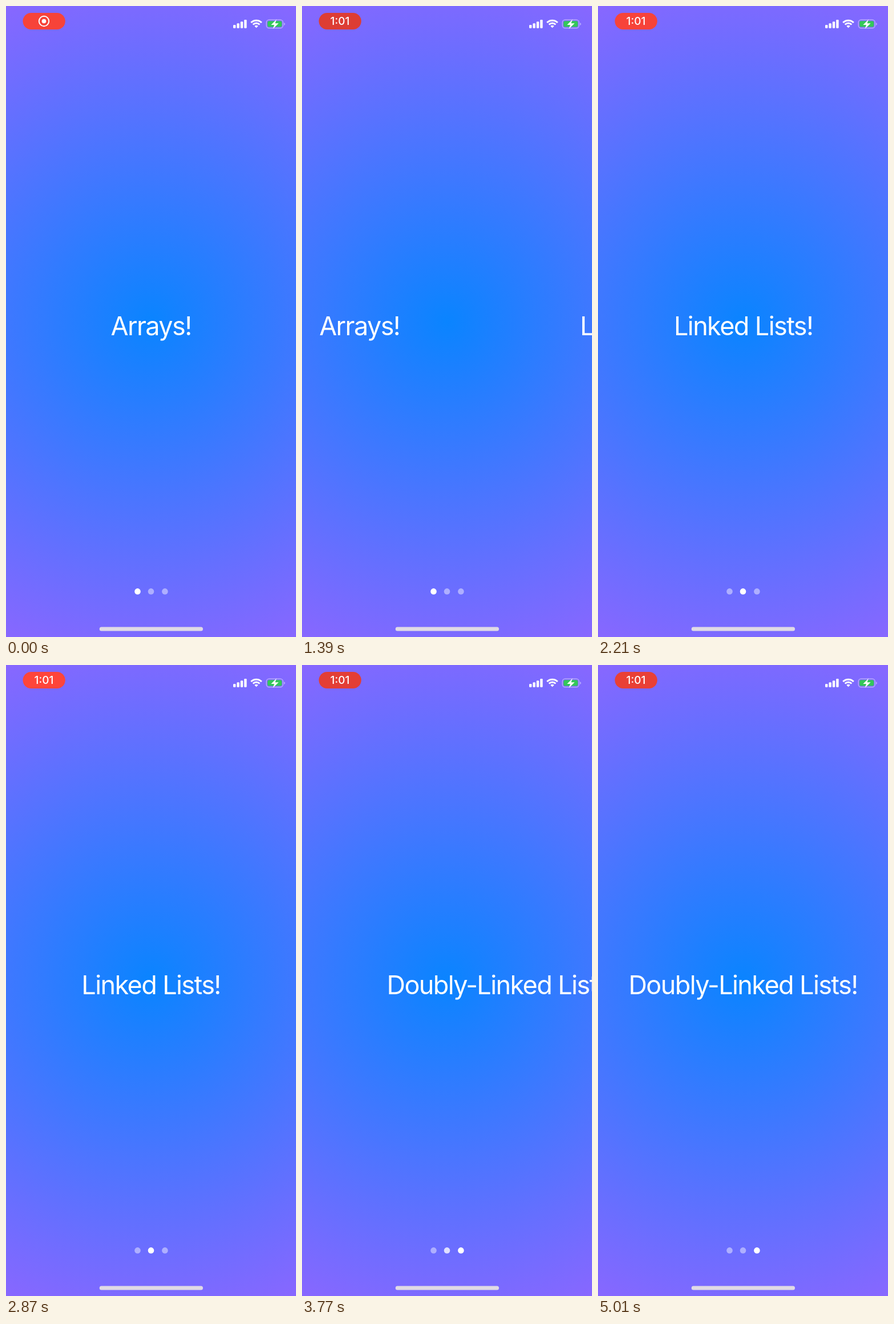
An HTML page for the animation above (5060 ms loop, 508 by 1102 pixels).

```html
<!DOCTYPE html>
<html lang="en">
<head>
<meta charset="utf-8">
<title>Paged lists</title>
<style>
  html, body { margin: 0; width: 100%; height: 100%; overflow: hidden; background: #4673ff; }
  svg { display: block; width: 508px; height: 1102px; }
  text { font-family: Inter, Roboto, sans-serif; fill: #fff; text-anchor: middle; }
  .title { font-size: 45px; letter-spacing: -1.6px; }
  .clock { font-size: 19px; font-weight: 500; }
</style>
</head>
<body>
<svg viewBox="0 0 508 1102">
  <defs>
    <radialGradient id="glow" gradientUnits="userSpaceOnUse" cx="254" cy="551" r="607">
      <stop offset="0" stop-color="#0a84ff"/>
      <stop offset="1" stop-color="#8867ff"/>
    </radialGradient>
  </defs>
  <rect width="508" height="1102" fill="url(#glow)"/>

  <g id="pages">
    <text class="title" x="254" y="575">Arrays!</text>
    <text class="title" x="762" y="575">Linked Lists!</text>
    <text class="title" x="1270" y="575">Doubly-Linked Lists!</text>
  </g>

  <rect id="pill" x="29.5" y="12" width="74.3" height="29" rx="14.5"/>
  <g id="record">
    <circle cx="66.5" cy="26.5" r="8.7" fill="none" stroke="#fff" stroke-width="2"/>
    <circle cx="66.5" cy="26.5" r="3.8" fill="#fff"/>
  </g>
  <text id="clock" class="clock" x="66.5" y="33.3">1:01</text>

  <g fill="#fff">
    <rect x="398" y="33" width="4.4" height="5.7" rx="1.2"/>
    <rect x="404.4" y="30.3" width="4.4" height="8.4" rx="1.2"/>
    <rect x="410.8" y="27.2" width="4.4" height="11.5" rx="1.2"/>
    <rect x="417.2" y="24" width="4.4" height="14.7" rx="1.2"/>
  </g>

  <g transform="translate(438.5 38.3)" fill="none" stroke="#fff" stroke-width="3">
    <path d="M-9.3-9.3A13.2 13.2 0 0 1 9.3-9.3"/>
    <path d="M-5.8-5.8A8.2 8.2 0 0 1 5.8-5.8"/>
    <path d="M0 0L-3.2-3.2A4.5 4.5 0 0 1 3.2-3.2Z" fill="#fff" stroke="none"/>
  </g>

  <rect x="456.2" y="24.2" width="29" height="14.4" rx="4.6" fill="none" stroke="#fff" stroke-opacity=".5" stroke-width="1.3"/>
  <path d="M487 29v5q1.7-.7 1.7-2.5T487 29Z" fill="#fff" fill-opacity=".5"/>
  <rect x="458.2" y="26.2" width="25" height="10.4" rx="2.8" fill="#34c759"/>
  <path d="M474 23.2L464.3 33H470L467.5 40L477.6 30.2H471.4Z" fill="#fff"/>

  <g id="dots" fill="#fff">
    <circle cx="230.5" cy="1022.4" r="5.3"/>
    <circle cx="254" cy="1022.4" r="5.3"/>
    <circle cx="278.4" cy="1022.4" r="5.3"/>
  </g>
  <rect x="163.7" y="1084.5" width="181.3" height="7" rx="3.5" fill="#e0dae5"/>
</svg>

<script>
const LOOP = 5060, PAGE = 508, SETTLE = 120, DIM = 0.45, FADE = 300;

// Each swipe: finger path as [time, distance], then an exponential settle.
const swipes = [
  { drag: [[850, 0], [990, 75], [1300, 110], [1470, 191]], flip: 1496 },
  { drag: [[3460, 0], [3560, 70], [3640, 227]], flip: 3652 }
];
const stalls = [570, 990, 1130, 1550, 1690, 3350, 3770, 3910, 4330], STALL = 100;

const el = id => document.getElementById(id);
const pages = el('pages'), pill = el('pill'), record = el('record'), clock = el('clock');
const dots = [...el('dots').children];
const clamp = v => Math.max(0, Math.min(1, v));
const mix = (a, b, k) => a + (b - a) * k;

function held(t) {
  const stall = stalls.find(s => t >= s && t < s + STALL);
  return stall === undefined ? t : stall;
}

function travel({ drag }, t) {
  const [endTime, endPos] = drag[drag.length - 1];
  if (t <= drag[0][0]) return 0;
  if (t >= endTime) return PAGE - (PAGE - endPos) * Math.exp((endTime - t) / SETTLE);
  const i = drag.findIndex(([time]) => time > t);
  const [t0, x0] = drag[i - 1], [t1, x1] = drag[i];
  return mix(x0, x1, (t - t0) / (t1 - t0));
}

function dotOpacity(i, t) {
  const start = i ? swipes[i - 1].flip : -Infinity;
  const end = i < swipes.length ? swipes[i].flip : Infinity;
  if (t < start) return DIM;
  return t < end ? 1 : mix(1, DIM, clamp((t - end) / FADE));
}

function draw(time) {
  const t = held(time);
  const scroll = swipes.reduce((sum, s) => sum + travel(s, t), 0);
  pages.setAttribute('transform', `translate(${-scroll} 0)`);
  dots.forEach((dot, i) => dot.setAttribute('opacity', dotOpacity(i, t)));

  const pulse = (1 + Math.cos((t - 2700) / 3200 * 2 * Math.PI)) / 2;
  pill.setAttribute('fill', `rgb(${mix(218, 255, pulse)},${mix(60, 69, pulse)},${mix(52, 58, pulse)})`);

  const swap = clamp((t - 910) / 320);
  record.setAttribute('opacity', 1 - swap);
  clock.setAttribute('opacity', swap);
}

const began = performance.now();
function tick() {
  draw((performance.now() - began) % LOOP);
  requestAnimationFrame(tick);
}
tick();
</script>
</body>
</html>
```
